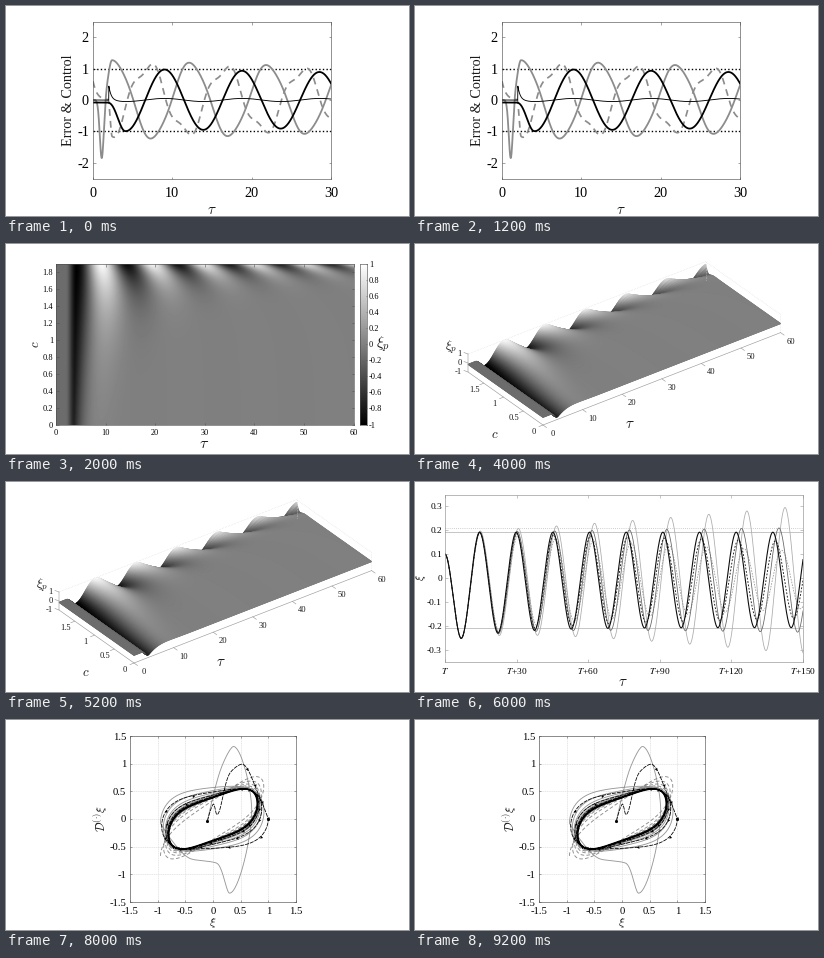
Write a matplotlib script that moves like this. It is 403x210 px and loops after 10000 ms.

```python
import numpy as np
import matplotlib.pyplot as plt
from matplotlib.animation import FuncAnimation

W, H, DPI = 403, 210, 64
PT = 72 / DPI  # points per pixel

plt.rcParams.update({
    "font.family": "Liberation Serif",
    "mathtext.fontset": "cm",
    "axes.unicode_minus": False,
})
fig = plt.figure(figsize=(W / DPI, H / DPI), dpi=DPI, facecolor="white")


def panel(box, xlim, ylim, xticks, yticks, size, pads, edge="0.3", tick=2.5):
    """Axes whose frame runs from (left, top) to (right, bottom) in pixels."""
    l, t, r, b = box
    ax = fig.add_axes([l / W, 1 - b / H, (r - l) / W, (b - t) / H])
    ax.set(xlim=xlim, ylim=ylim)
    ax.set_xticks(xticks, [f"{v:g}" for v in xticks])
    ax.set_yticks(yticks, [f"{v:g}" for v in yticks])
    ax.tick_params(direction="in", top=True, right=True, length=tick * PT,
                   width=0.5 * PT, color=edge, labelsize=size * PT)
    ax.tick_params(axis="x", pad=pads[0] * PT)
    ax.tick_params(axis="y", pad=pads[1] * PT)
    for side in ax.spines.values():
        side.set(linewidth=0.6 * PT, color=edge)
    return ax


def note(x, y, s, size, **kw):
    kw = {"ha": "center", "va": "center", "color": "0.1"} | kw
    fig.text(x / W, 1 - y / H, s, size=size * PT, **kw)


def smooth(a, b, x):
    u = np.clip((x - a) / (b - a), 0, 1)
    return u * u * (3 - 2 * u)


def curve(px, py, x):
    """Monotone cubic through the points, flat at every turning point."""
    px, py = np.asarray(px, float), np.asarray(py, float)
    h = np.diff(px)
    s = np.diff(py) / h
    d = np.zeros_like(py)
    same = s[:-1] * s[1:] > 0
    d[1:-1][same] = 2 * s[:-1][same] * s[1:][same] / (s[:-1] + s[1:])[same]
    i = np.clip(np.searchsorted(px, x) - 1, 0, len(h) - 1)
    u = (x - px[i]) / h[i]
    return ((1 + 2 * u) * (1 - u) ** 2 * py[i] + u * (1 - u) ** 2 * h[i] * d[i]
            + u * u * (3 - 2 * u) * py[i + 1] + u * u * (u - 1) * h[i] * d[i + 1])


def path(points, n=200):
    """Smooth plane curve through a few points."""
    p = np.array(points)
    k = np.r_[0, np.cumsum(np.hypot(*np.diff(p, axis=0).T))]
    t = np.linspace(0, k[-1], n)
    return curve(k, p[:, 0], t), curve(k, p[:, 1], t)


def control():
    ax = panel((87, 15.5, 325, 172.5), (0, 30), (-2.5, 2.5),
               range(0, 31, 10), range(-2, 3), 14.3, (8.5, 4))
    t = np.linspace(0, 30, 1200)
    fade = np.exp(-t / 150)
    for y in (-1, 1):
        ax.axhline(y, color="k", lw=1.4 * PT, ls=(0, (1, 1.6)))

    # the third harmonic gives the shoulders
    a = np.pi * (t - 7.4) / 4.86
    start = .6 * np.exp(-t / .5)
    wave = fade * (1.1 * np.cos(a) - .33 * np.sin(a)
                   + .1 * np.cos(3 * a) + .17 * np.sin(3 * a))
    on = smooth(1.9, 2.4, t)
    ax.plot(t, start * (1 - on) + wave * on, color="0.55", lw=1.7 * PT,
            ls=(0, (4, 3)))

    a = np.pi * (t - 2.6) / 4.85
    dip = -1.85 * np.exp(-((t - 1.1) / .35) ** 2)
    on = smooth(1.2, 2.4, t)
    wave = 1.28 * fade * (np.cos(a) - .04 * np.sin(3 * a))
    ax.plot(t, dip + wave * on, color="0.55", lw=1.8 * PT)

    spike = .45 * np.exp(-np.maximum(t - 2, 0) / .3) * (t > 2)
    ax.plot(t, spike - .05 * np.cos(2 * np.pi * (t - 4.1) / 9.8) * smooth(0, 4, t),
            color="k", lw=0.9 * PT)

    wave = -1.01 * np.exp(-t / 230) * np.cos(np.pi * (t - 4.15) / 4.88)
    on = smooth(1.6, 4, t)
    ax.plot(t, wave * on - .08 * (1 - on), color="k", lw=1.8 * PT)
    note(62, 94, "Error & Control", 14.2, rotation=90)
    note(206, 204, r"$\tau$", 15)


def field(t, c):
    """Response that decays faster and swings slower as c drops."""
    d = 1.9 - c
    start = 4.1 - 0.25 * d
    omega = 0.42 + 0.195 * np.exp(-d / 0.35)
    amp = 1 - 0.14 * d
    s = t - start
    wave = -amp * np.exp(-(0.006 + 0.25 * d) * np.maximum(s, 0)) * np.cos(omega * s)
    onset = -0.15 - (amp - 0.15) * smooth(1.9, start, t)
    return np.where(s < 0, onset, wave)


def heatmap():
    ax = panel((50, 20, 347.5, 180.5), (0, 60), (0, 1.9), range(0, 61, 10),
               np.arange(0, 1.9, 0.2), 8.3, (4.5, 3))
    t, c = np.meshgrid(np.linspace(0, 60, 600), np.linspace(0, 1.9, 320))
    gray = dict(cmap="gray", vmin=-1, vmax=1, origin="lower", aspect="auto")
    ax.imshow(field(t, c), extent=(0, 60, 0, 1.9), interpolation="bilinear", **gray)
    bar = panel((354, 20, 360.5, 180.5), (0, 1), (-1, 1), [],
                np.round(np.linspace(-1, 1, 11), 1), 8.3, (3, 2.5), tick=1.5)
    bar.imshow(np.linspace(-1, 1, 256)[:, None], extent=(0, 1, -1, 1), **gray)
    bar.yaxis.tick_right()
    note(30, 100, "$c$", 13, rotation=90)
    note(198, 200, r"$\tau$", 16)
    note(377, 100, r"$\xi_p$", 15)


def project(t, c, z):
    f = 1 - c / 1.9
    return 53 + 75 * f + 3.96 * t, 119 + 53 * f - 1.54 * t - 9 * z


def surface():
    ax = fig.add_axes([0, 0, 1, 1])
    ax.set(xlim=(0, W), ylim=(H, 0))
    ax.axis("off")

    def edge(*pts, **kw):
        ax.plot(*zip(*(project(*p) for p in pts)), **kw)

    back = dict(color="0.85", lw=0.6 * PT, ls=":")
    edge((0, 1.9, 1), (60, 1.9, 1), (60, 0, 1), (60, 0, -1), **back)
    edge((60, 1.9, 1), (60, 1.9, -1), **back)

    # far corner first, so near cells cover far ones
    t, c = np.meshgrid(np.linspace(60, 0, 361), np.linspace(1.9, 0, 91))
    z = field(t, c)
    ax.pcolormesh(*project(t, c, z), z, shading="gouraud", cmap="gray", vmin=-1, vmax=1)

    line = dict(color="0.6", lw=0.6 * PT)
    edge((0, 1.9, 1), (0, 1.9, -1), (0, 0, -1), (60, 0, -1), **line)

    def tick(p, dx, dy, lx, ly):
        x, y = project(*p)
        ax.plot([x, x + dx], [y, y + dy], **line)
        note(x + lx, y + ly, f"{sum(p) + 1:g}", 8.5)

    for v in range(0, 61, 10):
        tick((v, 0, -1), 3.5, 2.5, 10, 9)
    for v in (0, 0.5, 1, 1.5):
        tick((0, v, -1), -4, 1.6, -9.5, 7)
    for v in (-1, 0, 1):
        x, y = project(0, 1.9, v)
        ax.plot([x - 4, x], [y - 1.5, y], **line)
        note(x - 6, y, f"{v}", 8.5, ha="right")
    note(36, 103, r"$\xi_p$", 13)
    note(80, 191, "$c$", 13)
    note(215, 181, r"$\tau$", 15)


def swings():
    marks = range(0, 151, 30)
    ax = panel((30, 12.5, 388, 179.5), (0, 150), (-.35, .35), marks,
               np.round(np.arange(-.3, .31, .1), 1), 9.4, (4.7, 3), "0.55", 3)
    ax.set_xticks(marks, [f"$T$+{v}" if v else "$T$" for v in marks],
                  math_fontfamily="stix")
    for y, ls in ((.193, "-"), (-.209, "-"), (.208, ":")):
        ax.axhline(y, color="0.72", lw=0.8 * PT, ls=ls)
    t = np.linspace(0, 150, 1500)
    j = np.arange(22)
    looks = [  # half period, growth per swing, colour, width, style
        (7.98, .0245, "0.68", .8, "-"),
        (7.90, -.028, "0.6", .8, (0, (2, 1.5))),
        (7.83, .005, "0.4", .8, "-"),
        (7.74, -.012, "0.1", .9, (0, (2, 1.8))),
        (7.68, 0, "0.05", 1.1, "-"),
    ]
    for half, grow, color, lw, ls in looks:
        amp = .2 * np.exp(grow * j)
        ext = np.where(j % 2, amp, -amp - .045 * np.exp(-j / 3)) - .008
        y = curve(np.r_[0, 6.8 + half * j], np.r_[.1, ext], t)
        ax.plot(t, y, color=color, lw=lw * PT, ls=ls)
    note(6, 96, r"$\xi$", 11, rotation=90)
    note(208, 200, r"$\tau$", 15)


def orbit(th, ax=0, ay=0, ap=0, rate=14):
    """Spiral onto the limit cycle; ax, ay, ap fade as th grows."""
    e = np.exp(-(th - th[0]) / rate)
    return ((.8 + ax * e) * np.sin(th),
            (.52 + ay * e) * np.sin(th + 1 + ap * e) - .05 * np.cos(3 * th))


def phase():
    marks = np.arange(-1.5, 1.6, .5)
    ax = panel((124, 16, 290, 182), (-1.5, 1.5), (-1.5, 1.5), marks, marks,
               10.6, (4.5, 4), tick=2)
    ax.grid(color="0.85", lw=0.6 * PT, ls=(0, (2, 1)))
    ax.set_axisbelow(True)
    first = (-.1, -.03)

    th = np.linspace(-np.pi / 2, 15 * np.pi, 1200)
    gx, gy = orbit(th, .15, .12, .45, 15)
    px, py = path([first, (.14, .9), (.37, 1.31), (.7, .15), (.3, -1.34),
                   (.07, -.8), (-.4, -.72), (gx[0], gy[0])])
    ax.plot(np.r_[px, gx], np.r_[py, gy], color="0.6", lw=0.9 * PT)

    ax.plot(*orbit(th, .15, .24, -.5, 13), color="0.55", lw=0.9 * PT,
            ls=(0, (4, 2.5)))

    th = np.linspace(np.pi / 2, 12 * np.pi, 1000)
    bx, by = orbit(th, .2, .08, .57, 7)
    px, py = path([first, (.01, .27), (.07, .08), (.3, .82), (.52, .99),
                   (.8, .5), (bx[0], by[0])])
    ax.plot([px[0], bx[0]], [py[0], by[0]], "ko", ms=2.2 * PT)
    bx, by = np.r_[px, bx], np.r_[py, by]
    ax.plot(bx, by, color="k", lw=0.8 * PT, ls=(0, (5, 1.2)))
    ax.plot(*orbit(np.linspace(0, 2 * np.pi, 200)), color="k", lw=1.6 * PT)
    for i in range(130, 780, 21):
        turn = np.degrees(np.arctan2(by[i + 1] - by[i], bx[i + 1] - bx[i])) - 90
        ax.plot(bx[i], by[i], marker=(3, 0, turn), color="k", ms=3.4 * PT, mew=0)
    note(95, 99, r"$\mathcal{D}^{(\cdot)}\xi$", 12, rotation=90)
    note(207, 203, r"$\xi$", 12)


slides = [control, heatmap, surface, swings, phase]


def draw(i):
    fig.clear()
    slides[i % len(slides)]()


anim = FuncAnimation(fig, draw, frames=len(slides), interval=2000,
                     repeat=True, repeat_delay=0, cache_frame_data=False)
plt.show()
```
